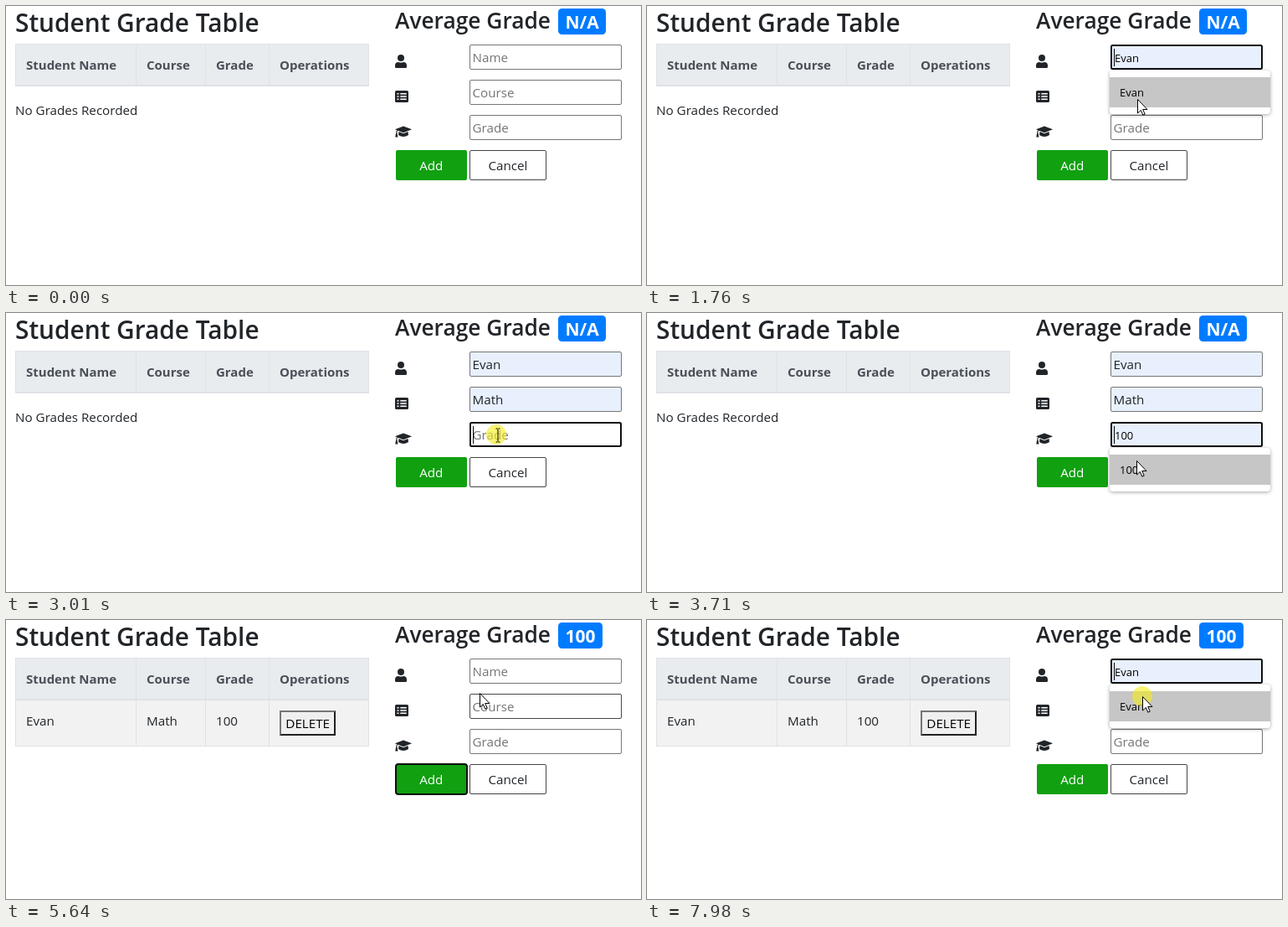
An HTML page for the animation above (8 s loop, 759 by 333 pixels).

```html
<!DOCTYPE html>
<html lang="en">
<head>
<meta charset="utf-8">
<title>Student Grade Table</title>
<style>
  html, body { margin: 0; width: 100%; height: 100%; overflow: hidden; background: #fff; }
  svg { display: block; width: 759px; height: 333px; }
  text { font: 15.2px "Open Sans", "Noto Sans", sans-serif; fill: #212529; white-space: pre; }
  .title { font-size: 29.8px; font-weight: 600; }
  .sub { font-size: 26.3px; font-weight: 600; }
  .head { font-size: 15px; font-weight: 700; fill: #495057; }
  .badge { font-size: 21px; font-weight: 700; fill: #fff; }
  .mid { text-anchor: middle; }
  .black { fill: #000; }
  .hint { fill: #757575; }
  .small { font-size: 13px; fill: #000; }
  .lines { fill: none; stroke: #dee2e6; }
  .icon { fill: #212529; }
  .panel { fill: #fff; filter: drop-shadow(0 1px 2px rgba(0, 0, 0, .35)); }
</style>
</head>
<body>
<svg viewBox="0 0 759 333">
  <text class="title" x="11" y="31">Student Grade Table</text>
  <rect x="11" y="45" width="423" height="50" fill="#e9ecef"/>
  <path class="lines" d="M11 45.5H434M11.5 45V96M155.5 45V96M238.5 45V96M314.5 45V96M433.5 45V96"/>
  <path class="lines" stroke-width="2" d="M11 95H434"/>
  <g>
    <text class="head" x="24" y="76">Student Name</text>
    <text class="head" x="168" y="76">Course</text>
    <text class="head" x="251" y="76">Grade</text>
    <text class="head" x="327" y="76">Operations</text>
  </g>
  <text id="empty" x="11" y="130">No Grades Recorded</text>
  <g id="row">
    <rect x="11" y="96" width="423" height="55" fill="#f2f2f2"/>
    <path class="lines" d="M11 150.5H434M11.5 96V151M155.5 96V151M238.5 96V151M314.5 96V151M433.5 96V151"/>
    <text x="24" y="126">Evan</text>
    <text x="168" y="126">Math</text>
    <text x="251" y="126">100</text>
    <rect x="327" y="108" width="67" height="30" fill="#efefef"/>
    <path fill="#767676" d="M327 138V108H394L392 110H329V136Z"/>
    <path fill="#212121" d="M327 138H394V108L392 110V136H329Z"/>
    <text class="mid black" x="360.7" y="129">DELETE</text>
  </g>

  <text class="sub" x="465" y="27">Average Grade</text>
  <rect id="badge" x="660" y="3" height="31" rx="4.5" fill="#007bff"/>
  <text id="average" class="badge" x="668.5" y="27"></text>

  <g class="icon" transform="translate(-.5 0)">
    <circle cx="472.5" cy="62" r="4"/>
    <path d="M465.5 72.5V71.2Q465.5 67 469.7 67Q472.5 68 475.3 67Q479.5 67 479.5 71.2V72.5Q479.5 74 478 74H467Q465.5 74 465.5 72.5Z"/>
    <rect x="465.5" y="101" width="16" height="14" rx="1.6"/>
    <path stroke="#fff" stroke-width="1.6" d="M468 104.7H470M468 108H470M468 111.3H470M471.8 104.7H479.2M471.8 108H479.2M471.8 111.3H479.2"/>
    <path d="M475.5 143.4L485.6 147.3L475.5 151.2L465.4 147.3Z"/>
    <path d="M470 150L475.5 152.2L481 150L481.5 154Q475.5 158 469.5 154Z"/>
    <path fill="none" stroke="#212529" d="M475.5 147.4L467.4 149V152"/>
    <path d="M466.7 151.5H468L469 156.5H465.7Z"/>
  </g>
  <g id="fields"></g>

  <rect x="466" y="172" width="85" height="36" rx="2" fill="#10a010"/>
  <rect id="ring" x="466" y="172" width="85" height="36" rx="3" fill="none" stroke="#101010" stroke-width="2"/>
  <text class="mid" x="508.3" y="196" style="fill:#fff">Add</text>
  <rect x="554.5" y="172.5" width="91" height="35" rx="1.5" fill="#fff" stroke="#444"/>
  <text class="mid" x="600" y="196">Cancel</text>

  <g id="menu">
    <rect class="panel" x="553" y="31" width="192" height="52" rx="4"/>
    <rect id="hot" x="553" y="39" width="192" height="36" fill="#c6c6c6"/>
    <text id="option" class="small" x="565" y="62"></text>
  </g>
  <circle id="press" r="12" fill="#f5eb1e" fill-opacity=".62"/>
  <g id="pointer">
    <path id="arrow" fill="#fff" stroke="#000" d="M.5 .5V17L4.3 13.4L6.8 19.2L9.2 18.2L6.7 12.5H12Z"/>
    <path id="hand" fill="#fff" stroke="#000" d="M-2 1.7Q-2 0 -.3 0Q1.5 0 1.5 1.7V7.5Q4.7 6.6 5 9Q7.4 7.9 8 10Q10 9.5 10 12V16Q10 18.5 8.3 22.5H-.5Q-1.5 19 -6 13.5Q-7 11 -5 10.5Q-3.5 10.5 -2 13ZM1.5 8V11.5M5 9V12M8 10V12.5"/>
    <path id="beam" fill="none" stroke="#000" d="M-.5-7H1.5M2.5-7H4.5M2-6.5V8.5M-.5 9H1.5M2.5 9H4.5"/>
  </g>
</svg>
<script>
const LOOP = 8000;
const $ = id => document.getElementById(id);
const show = (el, on) => { el.style.display = on ? '' : 'none'; };
const set = (el, attrs) => { for (const k in attrs) el.setAttribute(k, attrs[k]); };
const make = (parent, tag, attrs) => {
  const el = document.createElementNS('http://www.w3.org/2000/svg', tag);
  set(el, attrs);
  return parent.appendChild(el);
};

const fields = [['Name', 'Evan'], ['Course', 'Math'], ['Grade', '100']].map(([hint, value], i) => {
  const top = 46 + 42 * i;
  return {
    hint, value, top,
    box: make($('fields'), 'rect', { rx: 1.5 }),
    text: make($('fields'), 'text', { x: 558 }),
    caret: make($('fields'), 'rect', { y: top + 5, width: 1, height: 21 })
  };
});

// Page state changes: focused field (3 = Add), open menu, filled count, caret, press mark, saved row
const events = [
  [0, { focus: -1, menu: -1, filled: 0, caret: 0, press: 0, saved: 0 }],
  [1220, { focus: 0, caret: 1, press: 1 }],
  [1370, { menu: 0, press: 0 }],
  [1930, { menu: -1, filled: 1, press: 1 }],
  [2230, { focus: 1, menu: 1 }],
  [2380, { press: 0 }],
  [2700, { press: 1 }],
  [2780, { menu: -1, filled: 2 }],
  [3010, { focus: 2 }],
  [3080, { menu: 2 }],
  [3320, { press: 0 }],
  [3790, { press: 1 }],
  [3860, { menu: -1, filled: 3 }],
  [4010, { caret: 0, press: 0 }],
  [4550, { press: 1 }],
  [4630, { focus: 3 }],
  [4700, { filled: 0 }],
  [4780, { press: 0 }],
  [5250, { saved: 1 }],
  [6110, { focus: 0, caret: 1, press: 1 }],
  [6270, { menu: 0 }],
  [6420, { press: 0 }],
  [6820, { caret: 0 }],
  [7350, { caret: 1 }],
  [7980, { press: 1 }]
];

// Pointer track: time, x, y, number of steps to the next point (1 = hold)
const track = [
  [440, 548, 173, 8], [1050, 578, 27, 1], [1220, 586, 52, 1], [1370, 586, 62, 5],
  [1760, 586, 111, 1], [2230, 586, 102, 1], [2380, 586, 112, 4], [2700, 586, 150, 1],
  [3010, 586, 145, 1], [3320, 586, 150, 6], [3790, 585, 189, 1], [4010, 570, 188, 5],
  [4400, 503, 181, 1], [4550, 503, 187, 1], [4630, 500, 191, 1], [5420, 515, 168, 3],
  [5640, 566, 87, 2], [5790, 590, 60, 2], [5940, 604, 53, 1], [6110, 606, 65, 1],
  [7670, 600, 80, 2], [7830, 592, 91, 1], [LOOP, 592, 91, 1]
];

function pointerAt(t) {
  const i = track.findIndex(p => p[0] > t) - 1;
  if (i < 0) return null;
  const [t0, x0, y0, n] = track[i], [t1, x1, y1] = track[i + 1];
  const k = Math.floor((t - t0) / (t1 - t0) * n + 1e-6) / n;
  return { x: Math.round(x0 + (x1 - x0) * k), y: Math.round(y0 + (y1 - y0) * k) };
}

const inside = (p, x, y, w, h) => p && p.x >= x && p.x < x + w && p.y >= y && p.y < y + h;

function drawField(f, i, s, p, picking) {
  const focus = s.focus === i, filled = s.filled > i;
  const preview = s.menu === i && picking;
  const hover = s.menu < 0 && inside(p, 554, f.top - 1, 182, 31);
  const inset = focus ? 1 : .5;
  set(f.box, {
    x: 554 + inset, y: f.top + inset, width: 182 - 2 * inset, height: 30 - 2 * inset,
    fill: filled || preview ? '#e8f0fe' : '#fff',
    stroke: focus ? '#101010' : hover ? '#484848' : '#767676',
    'stroke-width': 2 * inset
  });
  f.text.textContent = filled || preview ? f.value : f.hint;
  set(f.text, {
    class: preview ? 'small' : filled ? '' : 'hint',
    x: preview ? 559 : 557.5,
    y: f.top + 21
  });
  show(f.caret, focus && s.caret);
  set(f.caret, { x: filled ? Math.round(558 + f.text.getComputedTextLength()) : 558 });
}

function draw(t) {
  const s = Object.assign({}, ...events.filter(e => e[0] <= t).map(e => e[1]));
  const p = pointerAt(t);
  const open = fields[s.menu];
  const overMenu = open && inside(p, 553, open.top + 31, 192, 52);
  const picking = open && inside(p, 553, open.top + 39, 192, 36);

  fields.forEach((f, i) => drawField(f, i, s, p, picking));
  show($('ring'), s.focus === 3);
  show($('row'), s.saved);
  show($('empty'), !s.saved);
  $('average').textContent = s.saved ? '100' : 'N/A';
  set($('badge'), { width: s.saved ? 53 : 57 });

  show($('menu'), open);
  if (open) {
    set($('menu'), { transform: `translate(0 ${open.top})` });
    $('option').textContent = open.value;
    show($('hot'), picking);
  }

  show($('pointer'), p);
  show($('press'), p && s.press);
  if (!p) return;
  set($('press'), { cx: p.x, cy: p.y });
  set($('pointer'), { transform: `translate(${p.x} ${p.y})` });
  const beam = !overMenu && fields.some(f => inside(p, 554, f.top, 182, 30));
  const hand = !overMenu && (inside(p, 466, 172, 85, 36) || inside(p, 554, 172, 92, 36));
  show($('beam'), beam);
  show($('hand'), hand);
  show($('arrow'), !beam && !hand);
}

function tick() {
  draw(performance.now() % LOOP);
  requestAnimationFrame(tick);
}
tick();
</script>
</body>
</html>
```
